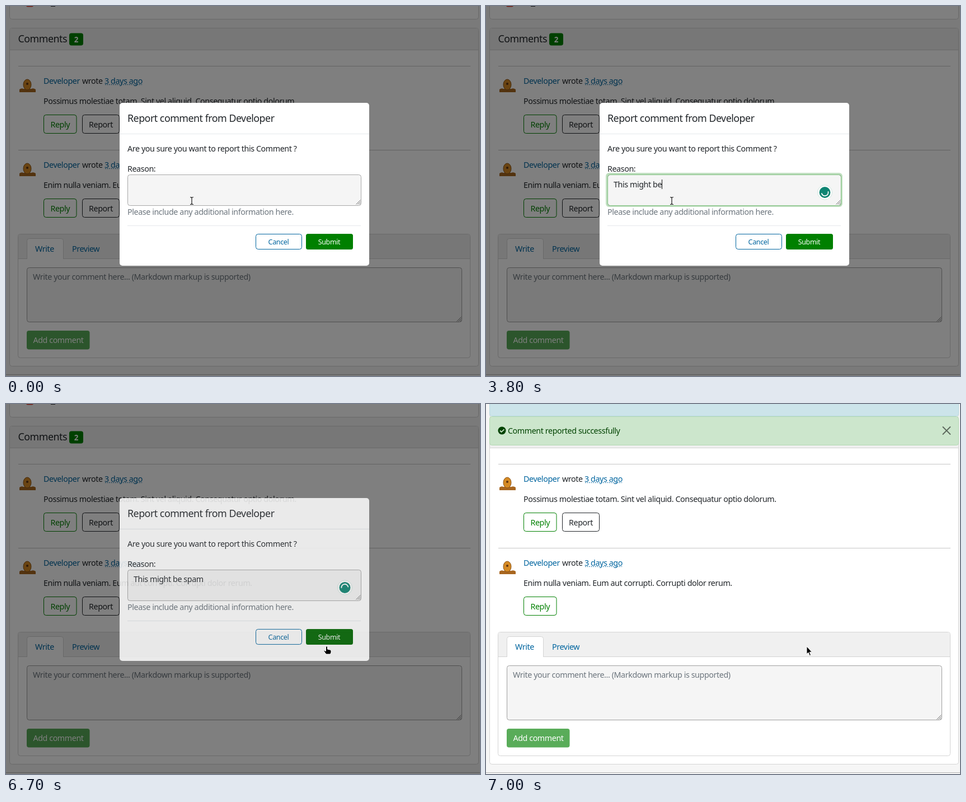
An HTML page for the animation above (8 s loop, 847 by 661 pixels).

```html
<!DOCTYPE html>
<html lang="en">
<head>
<meta charset="utf-8">
<title>Report a comment</title>
<style>
  html, body { margin: 0; width: 100%; height: 100%; overflow: hidden; background: #f6f6f6; }
  svg { display: block; width: 847px; height: 661px; }
  text {
    font: 14.27px "Noto Sans", "Open Sans", sans-serif;
    letter-spacing: -.028em; fill: #212529; white-space: pre;
  }
  .title { font-size: 17.84px; }
  .small { font-size: 12.49px; }
  .mid { text-anchor: middle; }
  .link { fill: #00659f; }
  .green { fill: #008000; }
  .white { fill: #fff; }
  .muted { fill: #6c757d; }
  .badge { font-size: 13.4px; font-weight: 700; }
</style>
</head>
<body>
<svg id="stage" viewBox="0 0 847 661" xmlns="http://www.w3.org/2000/svg"></svg>
<script>
const LOOP = 8000, STEP = 100;
const BLUE = '#00659f', GREEN = '#008000', EDGE = '#d4d4d4';

const text = (x, y, content, cls = '', extra = '') =>
  `<text x="${x}" y="${y}" class="${cls}" ${extra}>${content}</text>`;
const box = (x, y, w, h, fill, stroke = 'none', extra = '') =>
  `<rect x="${x + .5}" y="${y + .5}" width="${w - 1}" height="${h - 1}" rx="4" fill="${fill}" stroke="${stroke}" ${extra}/>`;
const rule = (x1, x2, y, color) => `<path d="M${x1} ${y + .5}H${x2}" stroke="${color}"/>`;
const grip = (x, y) =>
  `<path d="M${x - 8} ${y}l8 -8M${x - 5} ${y}l5 -5M${x - 2} ${y}l2 -2" stroke="#666" stroke-width=".9"/>`;
const outlineButton = (x, y, w, label, color, cls) =>
  box(x, y, w, 34, 'none', color) + text(x + w / 2, y + 22.5, label, 'mid ' + cls);

const avatar = y => `
  <path d="M24 ${y + 24}v-5q4 -3 7 -1h14q4 -2 8 1v5z" fill="#a8661f"/>
  <ellipse cx="38" cy="${y + 10.5}" rx="7" ry="9.5" fill="#d58a24" stroke="#8a5216"/>
  <circle cx="38" cy="${y + 9}" r="2" fill="#5b3110"/>`;

const comment = (y, body, reportId) => `
  ${rule(22, 830, y, '#c6c6c6')}
  ${avatar(y + 23)}
  ${text(67, y + 32, 'Developer', 'link')}
  ${text(136, y + 32, 'wrote')}
  ${text(176, y + 32, '3 days ago', 'link')}
  <path d="M177 ${y + 33.5}H243" stroke="${BLUE}" stroke-dasharray="1.8 1.8"/>
  ${text(67, y + 68, body)}
  ${outlineButton(67, y + 87, 59.5, 'Reply', GREEN, 'green')}
  <g id="${reportId}">${outlineButton(136, y + 87, 67, 'Report', '#212529', '')}</g>`;

const page = `
  <rect width="847" height="661" fill="#f6f6f6"/>
  ${box(6, -20, 839, 44, '#fff', EDGE)}
  <path d="M36 0h13q-1 1.5 -3 1.5h-7q-2 0 -3 -1.5z" fill="#e03a2a"/>
  <path d="M80 .5h8" stroke="#212529"/>
  ${box(6, 39, 839, 605, '#fff', EDGE)}
  <path d="M7 78V43q0 -3 3 -3H841q3 0 3 3V78z" fill="#f0f0f0"/>
  ${rule(7, 844, 78, EDGE)}
  ${text(21.5, 65, 'Comments', 'title')}
  <rect x="113" y="48.5" width="25" height="22" rx="4" fill="${GREEN}"/>
  ${text(125.5, 64.5, '2', 'badge white mid')}
  ${comment(107, 'Possimus molestiae totam. Sint vel aliquid. Consequatur optio dolorum.', 'report1')}
  ${comment(257, 'Enim nulla veniam. Eum aut corrupti. Corrupti dolor rerum.', 'report2')}
  ${box(21, 407, 809, 222, '#fff', EDGE)}
  <path d="M22 451V411q0 -3 3 -3H826q3 0 3 3V451z" fill="#f0f0f0"/>
  ${rule(22, 829, 451, EDGE)}
  <path d="M37.5 452V419.5q0 -4 4 -4H98.5q4 0 4 4V452" fill="#fff" stroke="${EDGE}"/>
  ${text(52, 439, 'Write', 'link')}
  ${text(118, 439, 'Preview', 'link')}
  ${box(37, 467, 778, 98, '#f5f5f5', '#a0a0a0')}
  ${text(48, 489, 'Write your comment here... (Markdown markup is supported)', 'muted')}
  ${grip(813.5, 563.5)}
  <rect x="37" y="580" width="112.5" height="33.5" rx="4" fill="#59ac59"/>
  ${text(93.5, 602, 'Add comment', 'white mid')}
  ${rule(0, 847, 658, '#b4b4b4')}`;

const alerts = `
  ${box(6, -20, 839, 42, '#cce4ea', '#b8d8e0')}
  ${box(6, 22, 839, 52, '#cce6cc', '#b3d9b3')}
  <circle cx="28.5" cy="47.5" r="7" fill="#004300"/>
  <path d="M25 47.5l2.6 2.6 4.8 -4.8" fill="none" stroke="#cce6cc" stroke-width="1.8"/>
  ${text(39, 53, 'Comment reported successfully', '', 'style="fill:#004300"')}
  <path d="M816.5 41l13 13m0 -13l-13 13" stroke="#5c685c" stroke-width="1.8" stroke-linecap="round"/>`;

const modal = `
  <rect x="203" y="173" width="446" height="291" rx="5" fill="#fff"/>
  ${text(217, 207, 'Report comment from Developer', 'title')}
  ${rule(203, 649, 228, '#e5e8eb')}
  ${text(217, 260, 'Are you sure you want to report this Comment ?')}
  ${text(217, 296, 'Reason:')}
  <rect id="ring" x="214" y="298" width="423" height="61" rx="6" fill="#bfdfbf"/>
  ${box(217, 301, 418, 56, '#f5f5f5', '#a8a8a8')}
  ${box(217, 301, 418, 56, 'none', '#7fbf7f', 'id="ringEdge"')}
  ${text(228, 323.5, '', '', 'id="typed"')}
  <path id="caret" d="M0 310v17" stroke="#111"/>
  ${grip(633.5, 354.5)}
  <g id="helper" transform="translate(605.5 333)">
    <circle r="13" fill="#fff" stroke="#d2e6e0"/>
    <circle r="10" fill="#0e8573"/>
    <path id="spinner" d="M-6 1A6 6 0 0 1 5.6 -2" fill="none" stroke="#fff" stroke-width="1.8" stroke-linecap="round"/>
  </g>
  ${text(217, 373, 'Please include any additional information here.', 'muted')}
  ${rule(217, 634, 392, '#e5e8eb')}
  ${box(446, 407, 83, 28, '#fff', BLUE)}
  ${text(487, 426, 'Cancel', 'small link mid')}
  <rect id="submit" x="536" y="407" width="84" height="28" rx="3.5"/>
  ${text(577.5, 426, 'Submit', 'small white mid')}`;

const beamPath = 'M-3 -6.5q3 0 3 1.5q0 -1.5 3 -1.5M0 -5V5M-3 6.5q3 0 3 -1.5q0 1.5 3 1.5';
const cursors = `
  <g id="beam" fill="none">
    <path d="${beamPath}" stroke="#fff" stroke-width="3"/>
    <path d="${beamPath}" stroke="#111" stroke-width="1.2"/>
  </g>
  <path id="hand" d="M-1.5 .5q1.5 -1.5 3 0V5l5 1.2q1.5 .5 1.5 2v2.8l-1.5 3H-1l-4 -5.5q0 -2 3.5 0z" fill="#000" stroke="#fff"/>
  <path id="arrow" d="M0 0V14l3 -3 2.3 5.5 2.2 -1 -2.3 -5.2H9.5z" fill="#000" stroke="#fff"/>`;

document.getElementById('stage').innerHTML = `
  ${page}
  <g id="alerts">${alerts}</g>
  <rect id="backdrop" width="847" height="661"/>
  <g id="modal">${modal}</g>
  <g id="cursor">${cursors}</g>`;

const el = id => document.getElementById(id);
const show = (id, on) => el(id).setAttribute('display', on ? 'inline' : 'none');
const set = (id, name, value) => el(id).setAttribute(name, value);
const clamp = v => Math.max(0, Math.min(1, v));
const progress = (t, start, duration) => clamp((t - start) / duration);

// One time per character of the message.
const message = 'This might be spam';
const keyTimes = [1200, 1400, 1600, 1800, 2000, 2900, 3000, 3200, 3300, 3500,
                  3600, 3700, 3800, 4000, 4600, 4800, 5000, 5300];

function drawField(t) {
  const count = keyTimes.filter(k => k <= t).length;
  const lastKey = count ? keyTimes[count - 1] : 700;
  el('typed').textContent = message.slice(0, count);
  const width = count ? el('typed').getComputedTextLength() : 0;
  set('caret', 'transform', `translate(${Math.round(228 + width) + .5} 0)`);
  show('caret', t >= 400 && t < 6500 && (t - lastKey + 100) % 1000 < 500);

  const focus = progress(t, 350, 200) * (1 - progress(t, 6450, 150));
  set('ring', 'opacity', focus);
  set('ringEdge', 'opacity', focus);

  show('helper', t >= 900);
  show('spinner', t >= 1100 && t < 2400 || t >= 2900);
  const turn = t < 2900 ? (t - 1900) / 1150 : .5 + (t - 3800) / 1150;
  set('spinner', 'transform', `rotate(${turn * 360})`);
}

function drawModal(t) {
  const closing = progress(t, 6680, 300);
  const easeOut = 1 - (1 - closing) ** 1.75;
  set('modal', 'transform', `translate(0 ${-44.6 * easeOut})`);
  set('modal', 'opacity', 1 - progress(t, 6675, 150));
  set('backdrop', 'opacity', .5 * (1 - progress(t, 6820, 150)));
  show('report2', t < 6800);
  show('alerts', t >= 7000);
}

function drawCursor(t) {
  const down = progress(t, 5300, 200);
  const across = progress(t, 5500, 500);
  const glide = across * across * (3 - 2 * across);
  const x = 332 + 2 * down + 239 * glide;
  const y = 348 + 22 * down + 63 * glide;
  const overSubmit = x > 536 && y > 407 && t < 6800;
  const kind = overSubmit ? 'hand' : y < 378 ? 'beam' : 'arrow';
  for (const id of ['beam', 'hand', 'arrow']) show(id, id === kind);
  set('cursor', 'transform', `translate(${x} ${y})`);
  set('submit', 'fill', overSubmit ? '#006700' : GREEN);
}

function frame(now) {
  const t = Math.floor(now % LOOP / STEP) * STEP;
  drawField(t);
  drawModal(t);
  drawCursor(t);
  requestAnimationFrame(frame);
}
frame(0);
</script>
</body>
</html>
```
